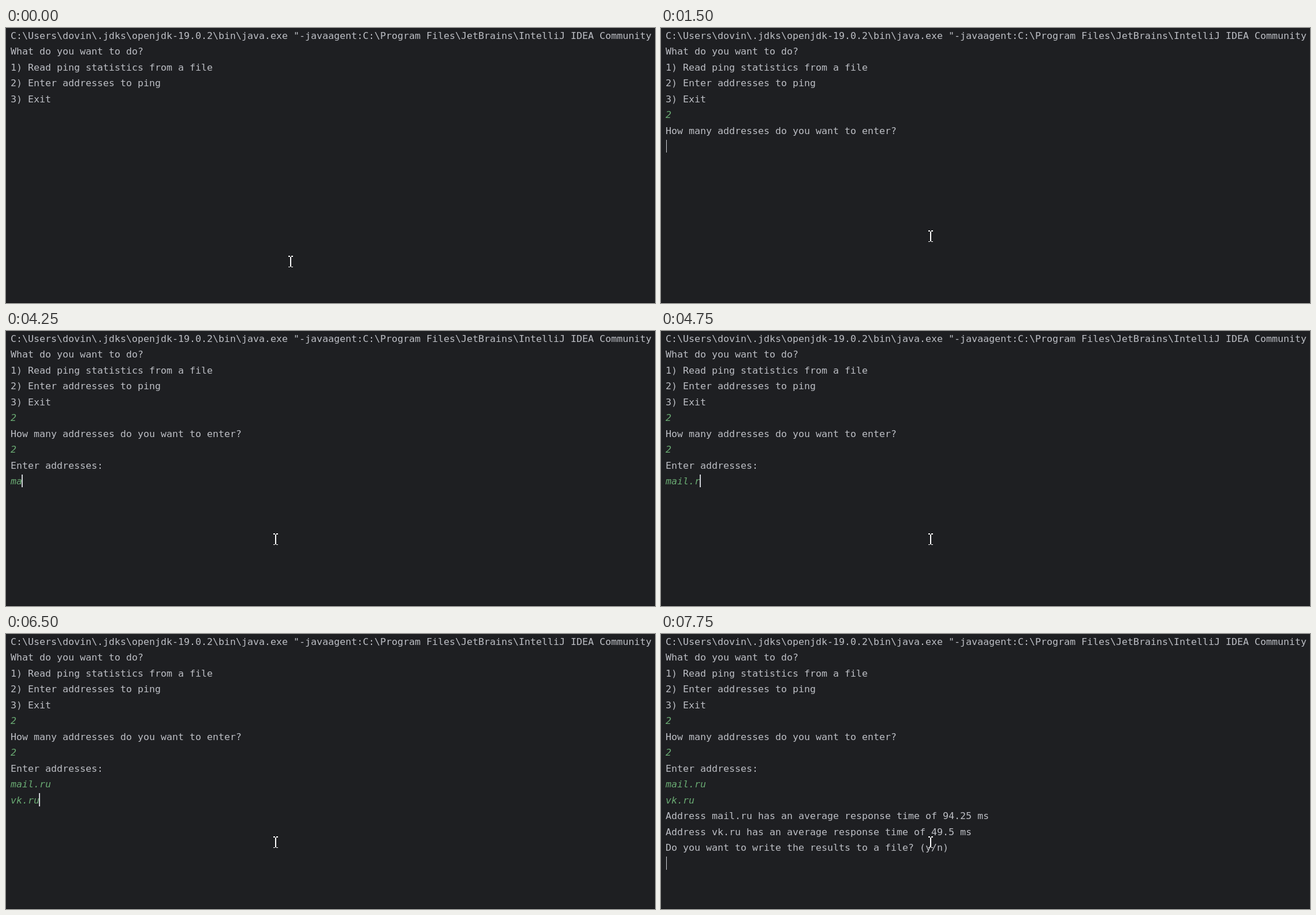
Animation of 1124 by 477 pixels, one loop 8 s. Source, as an HTML page with a canvas:

```html
<!DOCTYPE html>
<html lang="en">
<head>
<meta charset="utf-8">
<title>Ping console</title>
<style>
html, body { margin: 0; width: 100%; height: 100%; overflow: hidden; background: #1e1f22; }
canvas { display: block; }
</style>
</head>
<body>
<canvas id="stage" width="1124" height="477"></canvas>
<script>
const ctx = document.getElementById('stage').getContext('2d');
const LOOP = 8000, TICK = 250;
const LEFT = 8, CELL = 10, PITCH = 27.5;
const FONT = '16.61px "DejaVu Sans Mono", "Noto Sans Mono", monospace';
const BG = '#1e1f22', EDGE = '#151619', TEXT = '#bcbec4', INPUT = '#6aab73', CARET = '#ced0d6';

const print = (at, ...texts) => texts.map(text => ({ text, from: at, to: at, enter: at, color: TEXT, style: '' }));
// ease 1 types evenly, higher values start fast and slow down
const type = (text, from, to, enter, ease = 1) =>
  [{ text, from, to, enter, ease, color: INPUT, style: 'italic ' }];

const lines = [
  ...print(0,
    'C:\\Users\\dovin\\.jdks\\openjdk-19.0.2\\bin\\java.exe "-javaagent:C:\\Program Files\\JetBrains\\IntelliJ IDEA Community',
    'What do you want to do?',
    '1) Read ping statistics from a file',
    '2) Enter addresses to ping',
    '3) Exit'),
  ...type('2', 1500, 1500, 1500),
  ...print(1500, 'How many addresses do you want to enter?'),
  ...type('2', 3500, 3500, 3750),
  ...print(3750, 'Enter addresses:'),
  ...type('mail.ru', 4000, 5000, 5250, 1.9),
  ...type('vk.ru', 5750, 6500, 7250),
  ...print(7750,
    'Address mail.ru has an average response time of 94.25 ms',
    'Address vk.ru has an average response time of 49.5 ms',
    'Do you want to write the results to a file? (y/n)')
];

function shownText({ text, from, to, ease }, t) {
  if (t < from) return '';
  if (t >= to) return text;
  const p = (t - from) / (to - from);
  return text.slice(0, Math.floor(text.length * (1 - (1 - p) ** ease)));
}

function drawText(text, row, { color, style }) {
  ctx.font = style + FONT;
  ctx.fillStyle = color;
  const y = Math.floor(19 + PITCH * row);
  [...text].forEach((ch, i) => ctx.fillText(ch, LEFT + CELL * i, y));
}

function drawCaret(row, col) {
  const top = Math.floor(1.5 + PITCH * row);
  const bottom = Math.ceil(23.5 + PITCH * row);
  ctx.fillStyle = CARET;
  ctx.fillRect(LEFT + (col ? CELL * col - 1 : 1), top, col ? 2 : 1, bottom - top);
}

// Solid for a second after the last key, then off for half a second
function caretVisible(t) {
  let last = -1000;
  for (const { from, to, enter } of lines) {
    if (from > 0 && t >= from) last = Math.max(last, t >= enter ? enter : Math.min(t, to));
  }
  return (t - last) % 1500 < 1000;
}

function drawPointer(x, y) {
  ctx.fillStyle = '#fff';
  for (const dx of [0, 5]) {
    ctx.fillRect(x + dx, y, 3, 2);
    ctx.fillRect(x + dx, y + 19, 3, 1);
  }
  ctx.fillRect(x + 3, y + 2, 2, 17);
}

function draw(t) {
  ctx.fillStyle = BG;
  ctx.fillRect(0, 0, 1124, 477);
  ctx.fillStyle = EDGE;
  ctx.fillRect(0, 476, 1124, 1);

  let row = 0, col = 0;
  lines.forEach((line, i) => {
    const text = shownText(line, t);
    if (!text) return;
    drawText(text, i, line);
    const open = t < line.enter;
    row = open ? i : i + 1;
    col = open ? text.length : 0;
  });
  if (caretVisible(t)) drawCaret(row, col);

  if (t < TICK) drawPointer(489, 395);
  else drawPointer(463, 351);
}

function frame() {
  const t = performance.now() % LOOP;
  draw(Math.floor(t / TICK) * TICK);
  requestAnimationFrame(frame);
}
frame();
</script>
</body>
</html>
```
